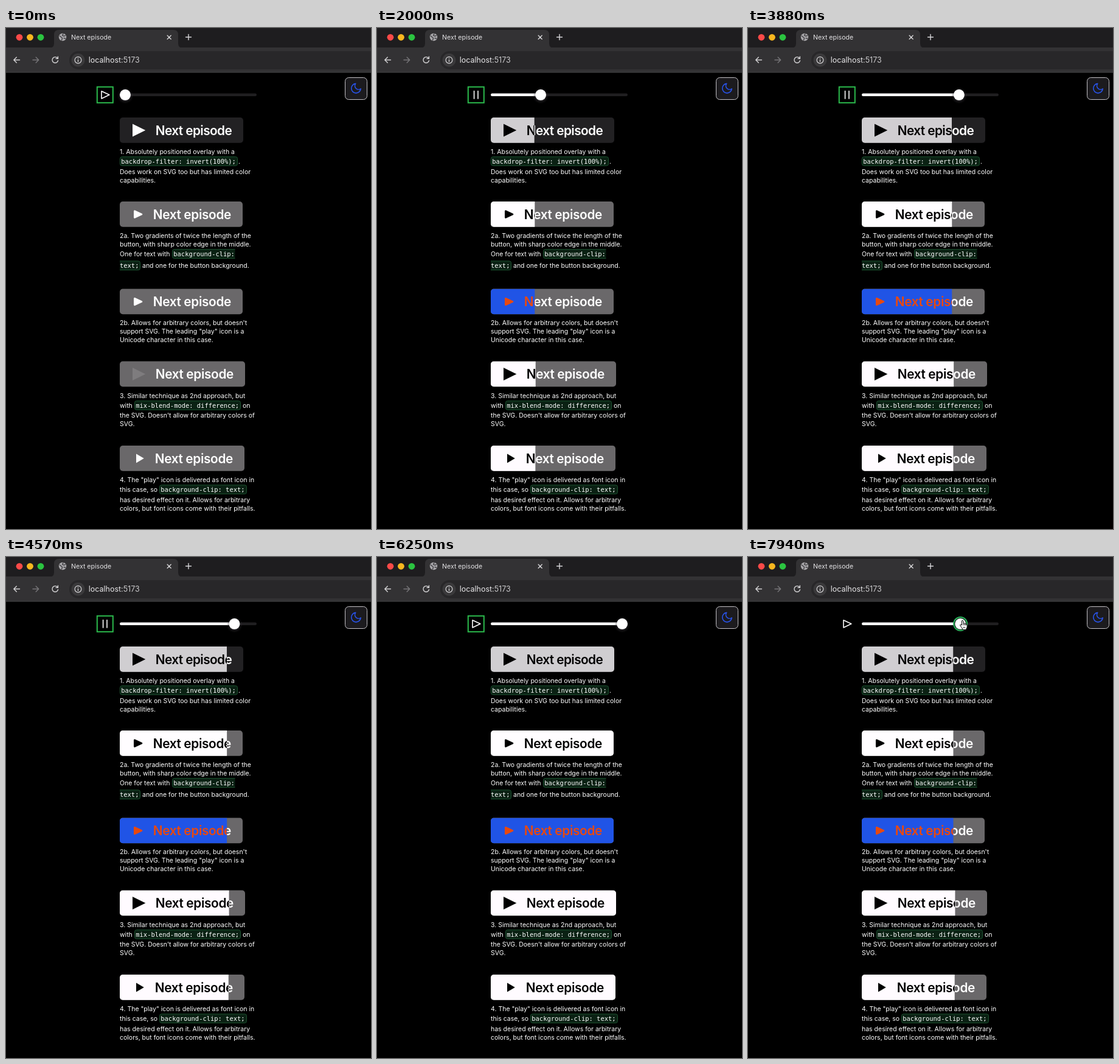
An HTML page that plays this animation: 600 px wide and 823 px high, repeating every 8000 ms.

```html
<!DOCTYPE html>
<html lang="en">
<head>
<meta charset="utf-8">
<title>Next episode</title>
<style>
html, body { margin: 0; width: 100%; height: 100%; overflow: hidden; background: #000; }
svg { display: block; width: 600px; height: 823px; }
text { font-family: Inter, sans-serif; white-space: pre; }
.cap { font-size: 10.5px; fill: #fff; }
.code { font-family: "DejaVu Sans Mono", monospace; font-size: 10.45px; fill: #fff; }
.chip { fill: #0a2113; stroke: #1c5230; stroke-width: 1; }
.line { fill: none; stroke-linecap: round; stroke-linejoin: round; }
</style>
</head>
<body>
<svg viewBox="0 0 600 823">
  <defs>
    <filter id="soft" x="-60%" y="-60%" width="220%" height="220%"><feGaussianBlur stdDeviation="2.2"/></filter>
  </defs>
  <rect width="600" height="823"/>

  <!-- browser bar -->
  <rect width="600" height="33" fill="#1e1d1f"/>
  <path d="M71 33Q79 33 79 25V11Q79 3 87 3H275Q283 3 283 11V25Q283 33 291 33Z" fill="#333234"/>
  <rect y="32" width="600" height="41" fill="#333234"/>
  <rect y="72.5" width="600" height="1" fill="#434244"/>
  <circle cx="22" cy="15.3" r="5.4" fill="#fb4a48"/>
  <circle cx="39.5" cy="15.3" r="5.4" fill="#f8b71f"/>
  <circle cx="57" cy="15.3" r="5.4" fill="#2bc440"/>
  <circle cx="93" cy="15" r="6.2" fill="#a9a8ab"/>
  <path d="M88.3 13.2L91.6 15.6L92.6 17.2L91.4 20M94 9.8L92.6 12L95 13.4L97.4 12.4M95.2 16.6L97.6 17.2" class="line" stroke="#49484b" stroke-width="1.6"/>
  <text x="107" y="18.7" font-size="10.6" fill="#e2e1e3">Next episode</text>
  <path d="M265.2 12.2l6 6m0-6l-6 6M295.5 15h9m-4.5-4.5v9" class="line" stroke="#d6d5d7" stroke-width="1.4"/>
  <path d="M22.5 52.5H13M17.3 48l-4.5 4.5l4.5 4.5" class="line" stroke="#d2d1d3" stroke-width="1.4"/>
  <path d="M44 52.5h9.5M49.2 48l4.5 4.5l-4.5 4.5" class="line" stroke="#777679" stroke-width="1.4"/>
  <path d="M84.6 49.5A4.8 4.8 0 1 0 85.5 53.5M85.4 47v3.4h-3.4" class="line" stroke="#d2d1d3" stroke-width="1.4"/>
  <rect x="104" y="38" width="520" height="30" rx="15" fill="#282729"/>
  <circle cx="118.5" cy="52.7" r="11" fill="#3a393b"/>
  <circle cx="118.5" cy="52.7" r="5.4" fill="none" stroke="#d6d5d7" stroke-width="1.2"/>
  <path d="M118.5 52.3v3M118.5 50v.1" class="line" stroke="#d6d5d7" stroke-width="1.3"/>
  <text x="135.7" y="57" font-size="12.5" fill="#e6e5e7">localhost<tspan fill="#c9c8ca">:5173</tspan></text>

  <!-- theme switch -->
  <rect x="557.5" y="81.5" width="36" height="36" rx="6" fill="#1c1b1e" stroke="#c4c2c6"/>
  <path transform="translate(565.1 88.8) scale(.86)" d="M21 12.8A9 9 0 1 1 11.2 3A7 7 0 0 0 21 12.8Z" class="line" stroke="#2853ea" stroke-width="1.9"/>

  <!-- player -->
  <rect id="focus" x="149.8" y="96.8" width="26" height="26" fill="none" stroke="#2bb94c" stroke-width="2"/>
  <path id="play" d="M157 103.7L169.8 109.8L157 116Z" class="line" stroke="#fff" stroke-width="1.6"/>
  <path id="pause" d="M159.6 103.5v12.6M166 103.5v12.6" class="line" stroke="#fff" stroke-width="1.6"/>
  <rect x="187" y="107.6" width="225" height="4.4" rx="2.2" fill="#201f21"/>
  <rect id="fill" x="187" y="107.6" height="4.4" rx="2.2" fill="#fff"/>
  <g id="thumb">
    <circle cy="1.5" r="10" fill="#3a393c" opacity=".7" filter="url(#soft)"/>
    <g id="ring">
      <circle r="12" fill="#2bb45c"/>
      <circle r="10" fill="#06150b"/>
    </g>
    <circle r="9" fill="#fff"/>
  </g>
  <g id="page"></g>
  <path id="hand" d="M-1.6 -5.6Q0 -6.8 1 -5V-1.2Q2.2 -2.2 3.3 -.9Q4.6 -1.5 5.3 -.1Q6.9 -.4 7 1.4V4Q6.9 6 5.8 7.4V9H-.4V7.6Q-2 6.2 -3.2 3.8L-4.6 1.6Q-4 -.2 -2.4 1L-1.7 1.8ZM1 -1.2V2M3.3 -.9V2M5.3 -.1V2M1 4.5V6.5M3.2 4.5V6.5" fill="#fff" stroke="#000" stroke-width="1" stroke-linejoin="round"/>
</svg>
<script>
const LOOP = 8000, START = 236, RUN = 5000;
const GRAB = 6800, DRAG = 7480;
const $ = id => document.getElementById(id);
const clamp = v => Math.max(0, Math.min(1, v));

const cap = (x, y, s) => `<text class="cap" x="${x}" y="${y}">${s}</text>`;
const codeText = (x, y, s) => `<text class="code" x="${x}" y="${y}">${s}</text>`;
const code = (x, y, w, s) =>
  `<rect class="chip" x="${x + .5}" y="${y - 10.9}" width="${w - 1}" height="14.6" rx="3"/>` + codeText(x + 2.3, y, s);
const lines = (ys, rows) => rows.map((s, i) => cap(187, ys[i], s)).join('');

const sharp = y => `M208 ${y - 10.5}L229.3 ${y}L208 ${y + 10.5}Z`;
const round = y => `M211.5 ${y - 5.2}L222.8 ${y}L211.5 ${y + 5.2}Z`;
const small = y => `M214 ${y - 7.6}L226.8 ${y}L214 ${y + 7.6}Z`;

// y, width, text x, letter spacing, icon, its stroke width, rest and played colours, edge shift
const buttons = [
  { y: 147, w: 203, tx: 245.7, gap: -.58, icon: sharp, bg: '#222123', on: '#d0ced1', ink: '#000', shift: 0 },
  { y: 285, w: 202, tx: 241.7, gap: -.35, icon: round, join: 3, bg: '#6a686a', on: '#fffdff', ink: '#000', shift: 1 },
  { y: 428.5, w: 202, tx: 241.7, gap: -.35, icon: round, join: 3, bg: '#6a686a', on: '#2054e6', ink: '#e8490f', shift: 1 },
  { y: 547.5, w: 206, tx: 245.7, gap: -.35, icon: sharp, rest: '#7e7c7e', bg: '#6a686a', on: '#fffbff', ink: '#000', shift: 1 },
  { y: 686, w: 205, tx: 244.7, gap: -.35, icon: small, bg: '#6a686a', on: '#fffbff', ink: '#000', shift: 1 }
];

function face(b, bg, ink, iconInk) {
  const mid = b.y + 21;
  return `<rect x="187" y="${b.y}" width="${b.w}" height="41.8" rx="5" fill="${bg}"/>
    <path d="${b.icon(mid)}" fill="${iconInk}" stroke="${iconInk}" stroke-width="${b.join || 0}" stroke-linejoin="round"/>
    <text x="${b.tx}" y="${mid + 7.9}" font-size="20.8" font-weight="600" letter-spacing="${b.gap}" fill="${ink}">Next episode</text>`;
}

$('page').innerHTML = buttons.map((b, i) =>
  `<clipPath id="clip${i}"><rect id="edge${i}" x="187" y="${b.y}" width="0" height="42"/></clipPath>
   ${face(b, b.bg, '#fff', b.rest || '#fff')}
   <g clip-path="url(#clip${i})">${face(b, b.on, b.ink, b.ink)}</g>`).join('') +
  lines([206.5, 239.5, 253.5], ['1. Absolutely positioned overlay with a',
    'Does work on SVG too but has limited color', 'capabilities.']) +
  code(187, 222.5, 194, 'backdrop-filter: invert(100%);') + cap(382, 222.5, '.') +
  lines([344.7, 358.9, 374.7], ['2a. Two gradients of twice the length of the',
    'button, with sharp color edge in the middle.', 'One for text with']) +
  '<path class="chip" d="M376.5 363.6H276.5Q273.5 363.6 273.5 366.6V375.4Q273.5 378.4 276.5 378.4H376.5"/>' +
  codeText(275.3, 374.7, 'background-clip:') +
  '<path class="chip" d="M187 382.8H217.5Q220.5 382.8 220.5 385.8V394.6Q220.5 397.6 217.5 397.6H187"/>' +
  codeText(187, 393.8, 'text;') + cap(224, 393.8, 'and one for the button background.') +
  lines([488, 502.2, 516.4], ['2b. Allows for arbitrary colors, but doesn\'t',
    'support SVG. The leading "play" icon is a', 'Unicode character in this case.']) +
  lines([607.5, 623.5, 640.3, 654.4], ['3. Similar technique as 2nd approach, but', 'with',
    'the SVG. Doesn\'t allow for arbitrary colors of', 'SVG.']) +
  code(211, 623.5, 175, 'mix-blend-mode: difference;') + cap(389, 623.5, 'on') +
  lines([745.7, 761.7, 778.7, 792.7], ['4. The "play" icon is delivered as font icon in', 'this case, so',
    'has desired effect on it. Allows for arbitrary', 'colors, but font icons come with their pitfalls.']) +
  code(252, 761.7, 144, 'background-clip: text;');

const show = (id, on) => $(id).setAttribute('visibility', on ? 'visible' : 'hidden');

function draw(t) {
  const pull = clamp((t - DRAG) / 460);
  const p = t < DRAG ? clamp((t - START) / RUN) : 1 - .26 * Math.pow(pull, 1.3);
  const x = 196 + 207 * p;
  const playing = t >= 190 && t < START + RUN;
  const held = t >= GRAB;
  buttons.forEach((b, i) =>
    $('edge' + i).setAttribute('width', p > 0 ? Math.min(b.w, b.w * p + b.shift) : 0));
  $('fill').setAttribute('width', x - 187);
  $('thumb').setAttribute('transform', `translate(${x} 109.8)`);
  $('hand').setAttribute('transform', `translate(${x + 1 + 3 * pull} 110.3)`);
  show('play', !playing);
  show('pause', playing);
  show('focus', !held);
  show('ring', held);
  show('hand', held);
}

function tick() {
  draw(performance.now() % LOOP);
  requestAnimationFrame(tick);
}
tick();
</script>
</body>
</html>
```
